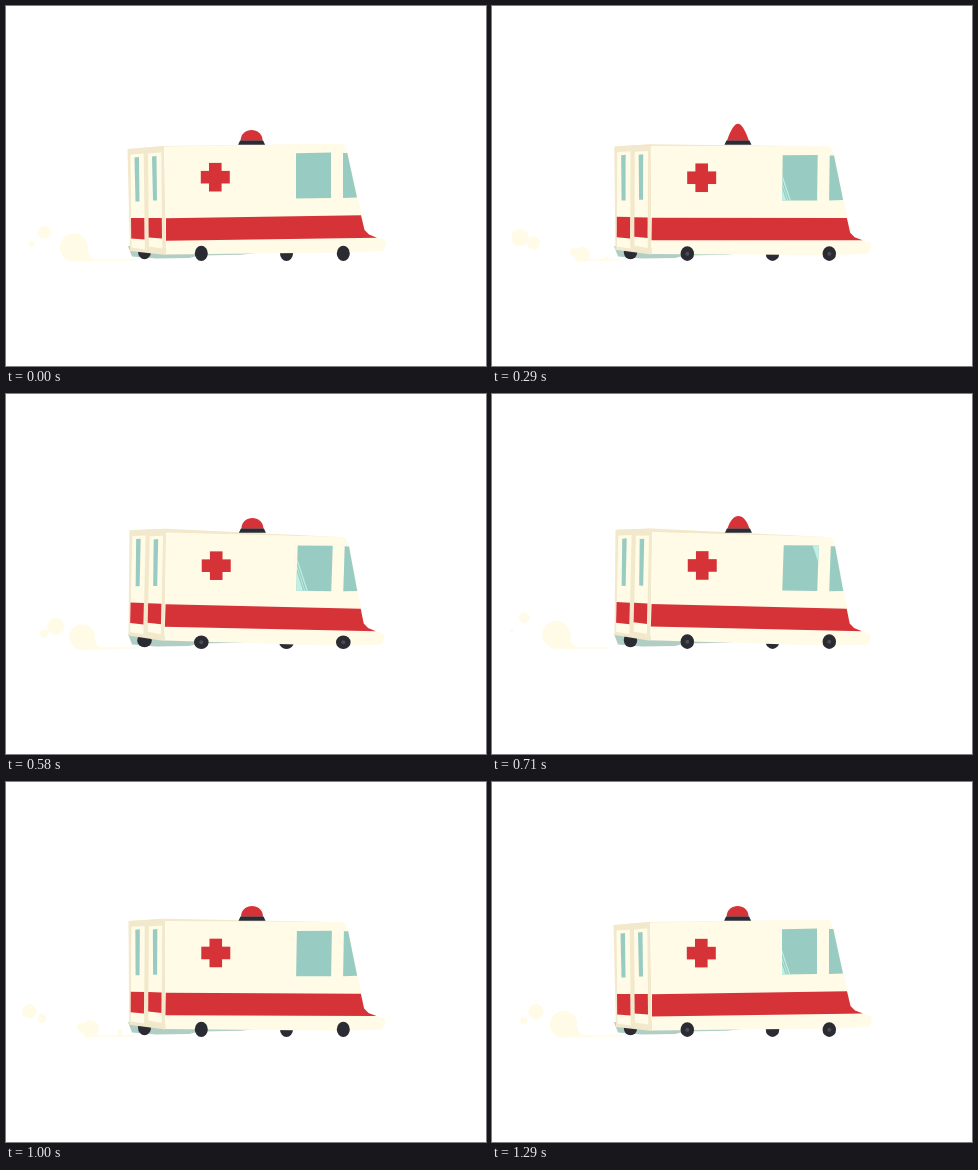
Write an HTML page with a canvas that moves like this. It is 480x360 px and loops after 1.33 s.

```html
<!DOCTYPE html>
<html lang="en">
<head>
<meta charset="utf-8">
<title>Ambulance</title>
<style>
html, body { margin: 0; width: 100%; height: 100%; overflow: hidden; background: #fff; }
canvas { display: block; }
</style>
</head>
<body>
<canvas id="stage" width="480" height="360"></canvas>
<script>
const ctx = document.getElementById('stage').getContext('2d');
const LOOP = 1330, FPS = 24, STEPS = 32, SMOKE_STEPS = 16, GLINT_STEPS = 8;
const CREAM = '#fffbe6', TAN = '#f2e8cb', RED = '#d63339', TEAL = '#98ccc2',
      DARK = '#2b2b33', HUB = '#4b4b52', SHADE = '#b1cec4', GLINT = '#bff0e4';

// A puff drifts left, rises by a power curve, swells and shrinks again.
const bigPuff = { born: 7, life: 19, x: [118, 20], y: [253, 235], rise: 0.6, size: 14, plump: 1, sway: 6 };
const puffs = [
  bigPuff,
  { born: 3, life: 16, x: [113, 21], y: [253, 217], rise: 1.5, size: 9.5, plump: 0.6, sway: 0 },
  { born: 3, life: 15, x: [107, 13], y: [253, 236], rise: 0.7, size: 5, plump: 0.6, sway: 0 },
  { born: 15, life: 12, x: [64, 10], y: [241, 220], rise: 2, size: 10, plump: 1, sway: 0 }
];

let tilt = 0, drop = 0;
const mix = (a, b, t) => a + (b - a) * t;

// The body rocks: the tail lifts while the nose dips.
const rock = ([x, y]) => [
  x + tilt * 0.032 * (200 - y),
  y + tilt * 5.4 * Math.sin((x - 203) / 105) + drop
];

function trace(points) {
  ctx.beginPath();
  points.forEach(p => ctx.lineTo(...p));
  ctx.closePath();
}

function fill(color, ...points) {
  trace(points);
  ctx.fillStyle = color;
  ctx.fill();
}

const panel = (color, ...points) => fill(color, ...points.map(rock));

function oval(color, x, y, rx, ry = rx) {
  ctx.fillStyle = color;
  ctx.beginPath();
  ctx.ellipse(x, y, rx, ry, 0, 0, 2 * Math.PI);
  ctx.fill();
}

function place(puff, step) {
  const age = (step - puff.born + 2 * SMOKE_STEPS) % SMOKE_STEPS;
  return [age, age + SMOKE_STEPS].filter(a => a < puff.life).map(a => {
    const u = a / puff.life;
    return {
      x: mix(...puff.x, u) - puff.sway * Math.sin(2 * Math.PI * u - 0.5),
      y: mix(...puff.y, u ** puff.rise),
      r: puff.size * Math.sin(Math.PI * u) ** puff.plump
    };
  });
}

function smoke(step) {
  puffs.forEach(puff => place(puff, step).forEach(p => oval(CREAM, p.x, p.y, p.r)));
  if (step > 3 && step < 10) {
    const left = 98 - 5 * (step - 4);
    fill(CREAM, [left, 253.3], [128, 253.3], [128, 255], [left, 255]);
    oval(CREAM, 114, 253, 2.5);
  }
  if (step > 9 || step < 3) {
    const { x, y, r } = place(bigPuff, step).pop();
    const end = 130 - 13 * (step % 13 % 10 && step < 3 ? step : 0);
    ctx.beginPath();
    ctx.moveTo(x, y + r);
    ctx.lineTo(end, 254.8);
    ctx.lineTo(end, 253.3);
    ctx.lineTo(x + r * 1.5, 253.3);
    ctx.quadraticCurveTo(x + r, 252, x + r, y);
    ctx.fill();
  }
}

function wheel(x, bottom, squash, hub) {
  const ry = 6.8 + 0.8 * squash;
  oval(DARK, x, bottom - ry, 7.3 - 0.8 * squash, ry);
  if (hub) oval(HUB, x, bottom - ry, 2);
}

function siren(step) {
  const bump = (center, height) => height * Math.exp(-(((step - center) / 1.6) ** 2));
  const lift = bump(6.5, 7) + bump(18.5, 5);
  const x = 245.6 + tilt * 0.8, base = 134.7, top = base - (10.7 + lift) * 4 / 3;
  const pinch = 11 / (1 + lift * 0.4);
  ctx.fillStyle = RED;
  ctx.beginPath();
  ctx.moveTo(x - 11, base);
  ctx.bezierCurveTo(x - pinch, top, x + pinch, top, x + 11, base);
  ctx.fill();
  fill(DARK, [x - 11.5, 134.5], [x + 11.5, 134.5], [x + 13.5, 138.8], [x - 13.5, 138.8]);
}

function sideWindow(beat) {
  const pane = [[290, 147.3], [325, 146.5], [325, 192], [290, 192.5]].map(rock);
  fill(TEAL, ...pane);
  if (beat === 0) return;
  const [left, top] = pane[0];
  const shift = 9.5 * Math.max(4 - beat, -2.2);
  ctx.save();
  trace(pane);
  ctx.clip();
  for (const [offset, width] of [[0, 9], [10.3, 0.8], [12.5, 1.2]]) {
    const a = left + offset + shift, b = a + width;
    fill(GLINT, [a, top - 1], [b, top - 1], [b + 16, top + 47], [a + 16, top + 47]);
  }
  ctx.restore();
}

function door(x, top, rise) {
  const right = x + 13.3;
  panel(CREAM, [x, top - rise], [right, top - 1 - rise], [right + 1, top + 95], [x + 1, top + 93]);
  panel(TEAL, [x + 4, top + 3 - rise], [x + 8.5, top + 2.5 - rise], [x + 9, top + 47], [x + 5, top + 47]);
  panel(RED, [x + 0.5, 212], [right + 0.5, 212], [right + 0.7, top + 85], [x + 0.7, top + 84]);
}

function body(beat) {
  const rise = 3 * tilt;
  const rearTop = [121.5, 143 - rise], edgeTop = [158, 140 - rise];
  panel(TAN, rearTop, edgeTop, [160, 249], [124, 245]);
  door(124.5, 148.5, rise);
  door(142, 147.5, rise * 0.8);
  panel(TAN, rearTop, edgeTop, [337, 138], [158.5, 141]);

  panel(CREAM, [158.5, 140.5], [335, 137.8], [338, 139], [342, 147], [351.5, 191.5], [356, 210],
    [358.5, 224], [363, 229], [371, 231.5], [379, 234], [380, 238], [377, 245], [340, 246.5], [160, 248.5]);
  panel(RED, [160, 212.3], [355, 209.3], [358.5, 224], [363, 228.5], [371, 231.7], [160, 234.7]);
  const [x, y] = rock([209.3, 171.2]);
  ctx.fillRect(x - 14.5, y - 6.3, 29, 12.6);
  ctx.fillRect(x - 6.3, y - 14.3, 12.6, 28.6);
  sideWindow(beat);
  panel(TEAL, [337, 147], [341.3, 147], [351, 191.5], [337, 192]);
}

function draw(step) {
  const beat = step % GLINT_STEPS;
  const turn = 2 * Math.PI * step / STEPS;
  const squash = Math.cos(2 * Math.PI * beat / GLINT_STEPS);
  const hub = beat % 4 !== 0;
  tilt = 0.52 - 0.53 * Math.cos(turn);
  drop = 0.4 * Math.sin(turn);
  fill('#fff', [0, 0], [480, 0], [480, 360], [0, 360]);
  smoke(step % SMOKE_STEPS);
  fill(SHADE, [122, 240], [126, 250.5], [150, 252.5], [183, 252], [193, 249.5], [235, 248.8], [250, 247]);
  wheel(138.5, 253.3, squash, false);
  wheel(280.5, 255, squash, false);
  body(beat);
  siren(step);
  wheel(195.3, 255, squash, hub);
  wheel(337.3, 255, squash, hub);
}

function tick(now) {
  const t = now % LOOP;
  draw(Math.min(STEPS - 1, Math.floor((t + 3.4) * FPS / 1000)));
  requestAnimationFrame(tick);
}
tick(0);
</script>
</body>
</html>
```
